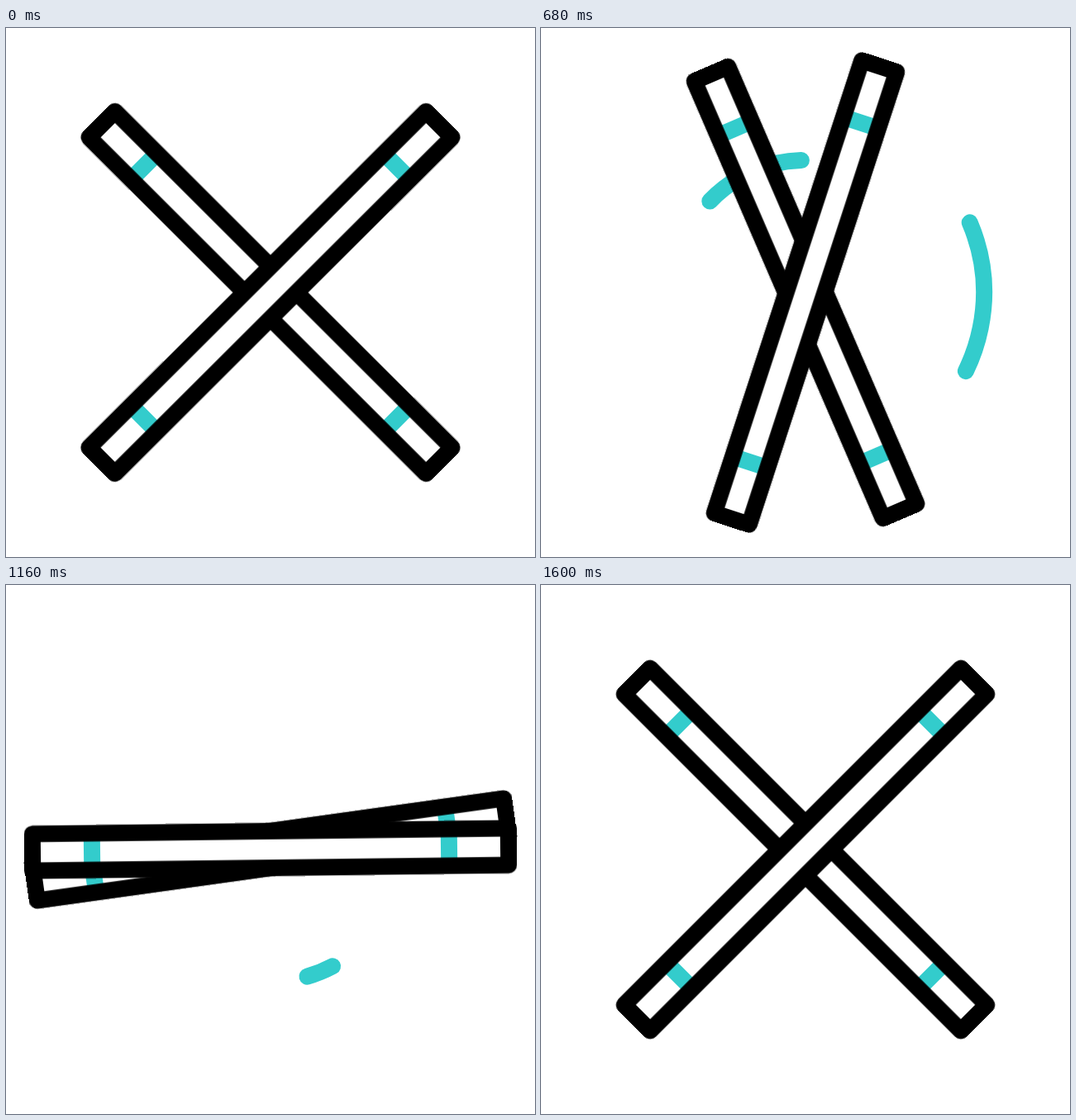
An HTML page that plays this animation: 640x640 px, repeating every 2.42 s.

```html
<!DOCTYPE html>
<html lang="en">
<head>
<meta charset="utf-8">
<title>Crossed sticks</title>
<style>
  @property --head { syntax: "<length>"; inherits: false; initial-value: 0px; }
  @property --tail { syntax: "<length>"; inherits: false; initial-value: 0px; }

  html, body { margin: 0; width: 100%; height: 100%; overflow: hidden; background: #fff; }
  svg { display: block; width: 100%; height: 100%; }

  .stick { animation: 2420ms infinite; }
  .front { animation-name: spin-left; }
  .back { animation-name: spin-right; }
  .bands { fill: #3cc; }
  .outline { fill: none; stroke: #000; stroke-width: 20; stroke-linejoin: round; }

  /* Circles measured in degrees; the dash runs from tail to head. */
  .swoosh {
    fill: none;
    stroke: #3cc;
    stroke-width: 20;
    stroke-linecap: round;
    stroke-dasharray: calc(var(--head) - var(--tail)) 999px;
    stroke-dashoffset: calc(-1 * var(--tail));
    visibility: hidden;
    animation: head 2420ms infinite, tail 2420ms infinite, show 2420ms infinite;
  }
  .outer { --len: 262px; animation-delay: 322ms, 435ms, 322ms; }
  .inner { --len: 260px; animation-delay: 334ms, 438ms, 334ms; }

  @keyframes spin-left {
    from { transform: rotate(-45deg); animation-timing-function: cubic-bezier(.495, -.36, .609, 1); }
    66.116%, to { transform: rotate(-225deg); }
  }
  @keyframes spin-right {
    from { transform: rotate(45deg); animation-timing-function: cubic-bezier(.545, -.315, .655, 1); }
    66.116%, to { transform: rotate(225deg); }
  }
  @keyframes head {
    from { --head: 0px; animation-timing-function: cubic-bezier(.333, 0, .667, 1); }
    34.3%, to { --head: var(--len); }
  }
  @keyframes tail {
    from { --tail: 0px; animation-timing-function: cubic-bezier(.333, 0, .667, 1); }
    34.3%, to { --tail: var(--len); }
  }
  @keyframes show {
    from, 38.6% { visibility: visible; }
    38.61%, to { visibility: hidden; }
  }
</style>
</head>
<body>
<svg viewBox="0 0 640 640">
  <defs>
    <g id="stick">
      <rect x="-288" y="-22.3" width="576" height="44.6" fill="#fff"/>
      <path class="bands" d="M-226-22.3h20v44.6h-20zM206-22.3h20v44.6h-20z"/>
      <rect class="outline" x="-288" y="-22.3" width="576" height="44.6"/>
    </g>
  </defs>
  <g transform="translate(320 320)">
    <g transform="rotate(-78.5)"><circle class="swoosh outer" r="216" pathLength="360"/></g>
    <g transform="rotate(-38) scale(1 -1)"><circle class="swoosh inner" r="160" pathLength="360"/></g>
    <g class="stick back"><use href="#stick"/></g>
    <g class="stick front"><use href="#stick"/></g>
  </g>
</svg>
</body>
</html>
```
